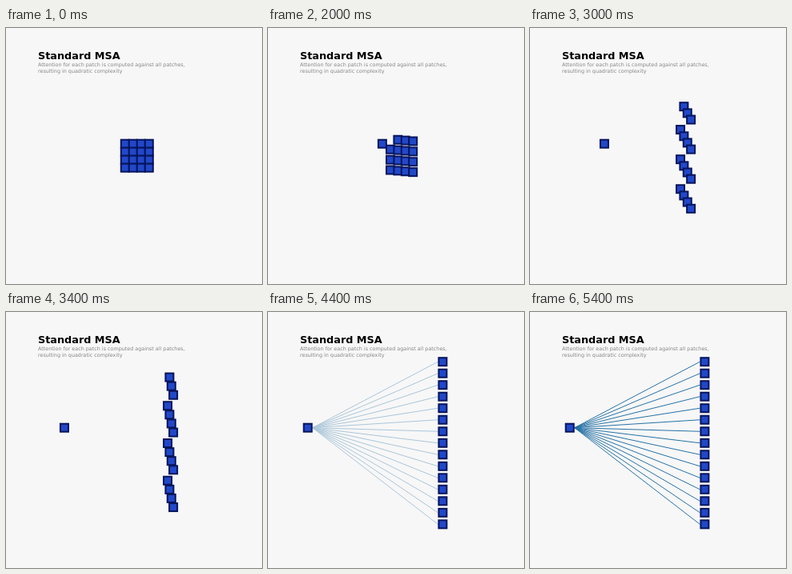
An HTML page that plays this animation: 320x320 px, repeating every 6000 ms.

```html
<!DOCTYPE html>
<html lang="en">
<head>
<meta charset="utf-8">
<title>Standard MSA</title>
<style>
  html, body { margin: 0; width: 100%; height: 100%; overflow: hidden; background: #f7f7f7; }
  svg { display: block; width: 100%; height: 100%; }
  text { font-family: "DejaVu Sans", sans-serif; }
  .title { font-size: 12.8px; font-weight: bold; fill: #000; }
  .note { font-size: 6.4px; fill: #858585; }
  .patch { fill: #2148c8; stroke: #07145c; stroke-width: 2; }
  .link { stroke: #0f639b; stroke-width: 1; }
</style>
</head>
<body>
<svg viewBox="0 0 320 320">
  <text class="title" x="40" y="38.6">Standard MSA</text>
  <text class="note" x="40" y="48.2">Attention for each patch is computed against all patches,</text>
  <text class="note" x="40" y="55.5">resulting in quadratic complexity</text>
  <g id="links"></g>
  <g id="patches"></g>
</svg>
<script>
const LOOP = 6000, STEP = 200, LAST = 5400;
const GRID = { x: 148.8, y: 144.7, gap: 10 };
const QUERY = { x: 49.7, y: 144.7 };
const COLUMN = { x: 218.4, y: 62.2, gap: 14.51 };
const SIZE = 10;

const links = document.getElementById('links');
const layer = document.getElementById('patches');

function add(parent, tag, attrs) {
  const el = document.createElementNS('http://www.w3.org/2000/svg', tag);
  for (const key in attrs) el.setAttribute(key, attrs[key]);
  return parent.appendChild(el);
}

const clamp = v => Math.min(1, Math.max(0, v));
const mix = (a, b, p) => a + (b - a) * p;

// The first patch is the query; the rest line up in a column.
const patches = Array.from({ length: 16 }, (_, i) => ({
  from: { x: GRID.x + (i % 4) * GRID.gap, y: GRID.y + Math.floor(i / 4) * GRID.gap },
  to: i ? { x: COLUMN.x, y: COLUMN.y + (i - 1) * COLUMN.gap } : QUERY,
  el: add(layer, 'rect', { class: 'patch', width: SIZE, height: SIZE })
}));

for (const { to } of patches.slice(1)) {
  add(links, 'line', { class: 'link', x1: QUERY.x + 6, y1: QUERY.y, x2: to.x - 6, y2: to.y });
}

function draw(time) {
  const t = Math.min(Math.floor(time / STEP) * STEP, LAST);
  const move = t < 2000 ? 0 : clamp(0.06 + (t - 2000) / 1985);
  for (const { from, to, el } of patches) {
    el.setAttribute('x', mix(from.x, to.x, move) - SIZE / 2);
    el.setAttribute('y', mix(from.y, to.y, move) - SIZE / 2);
  }
  links.setAttribute('opacity', t < 4000 ? 0 : clamp(0.1 + (t - 4000) / 1750));
}

const start = performance.now();
function tick() {
  draw((performance.now() - start) % LOOP);
  requestAnimationFrame(tick);
}
tick();
</script>
</body>
</html>
```
